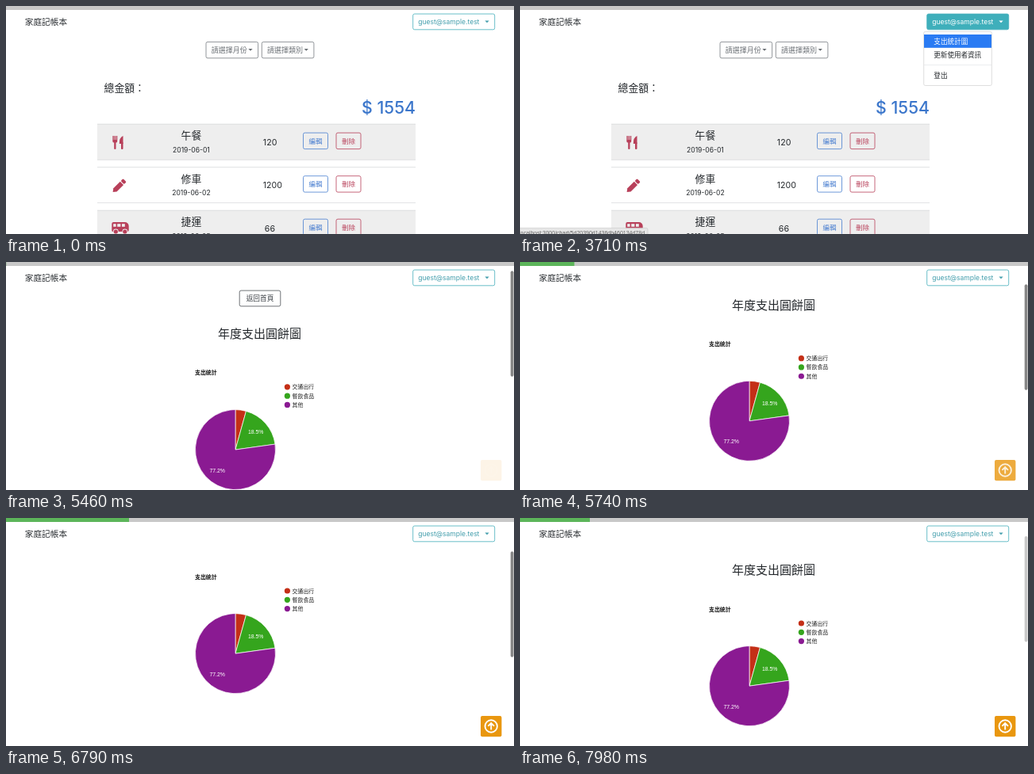
An HTML page with a canvas for the animation above (8000 ms loop, 640 by 288 pixels).

```html
<!DOCTYPE html>
<html lang="zh-Hant">
<head>
<meta charset="utf-8">
<title>家庭記帳本</title>
<style>
html, body { margin: 0; width: 100%; height: 100%; overflow: hidden; background: #fff; }
canvas { display: block; width: 640px; height: 288px; }
</style>
</head>
<body>
<canvas id="stage"></canvas>
<script>
const W = 640, H = 288, LOOP = 8000;
const canvas = document.getElementById('stage');
const ctx = canvas.getContext('2d');
const dpr = window.devicePixelRatio || 1;
canvas.width = W * dpr;
canvas.height = H * dpr;

const CJK = '"Noto Sans CJK TC", "Noto Sans CJK JP", "Noto Sans CJK", sans-serif';
const UI = 'Inter, ' + CJK;
const CHART = '"Liberation Sans", ' + CJK;
const INK = '#24282c', TEAL = '#43aeba', BLUE = '#4a7fd0', RED = '#b8405a';
const ACCOUNT = 'guest@sample.test';

// Event times in ms
const T = { hover: 1610, open: 2600, pick: 3010, leave: 4060, chart: 4760, bar: 5250, fade: 5420 };

const scrollKeys = [[5340, 0], [5460, 14], [5800, 58], [6150, 80], [7020, 80], [7140, 46], [7400, 40], [7980, 39]];
const progressKeys = [[5460, 0], [5850, 95], [6250, 155], [7060, 155], [7140, 144], [7600, 100], [7980, 88]];
const thumbKeys = [[7800, 1], [7980, 0.45]];

const clamp = v => Math.max(0, Math.min(1, v));

function track(keys, t) {
  if (t <= keys[0][0]) return keys[0][1];
  for (let i = 1; i < keys.length; i++) {
    const [t0, a] = keys[i - 1], [t1, b] = keys[i];
    if (t <= t1) return a + (b - a) * (t - t0) / (t1 - t0);
  }
  return keys[keys.length - 1][1];
}

function mix(from, to, k) {
  return `rgb(${from.map((v, i) => Math.round(v + (to[i] - v) * k)).join(',')})`;
}

// Text is placed by the vertical centre of its glyphs.
function text(str, x, cy, size, color = INK, { weight = 400, align = 'left', family = UI } = {}) {
  ctx.font = `${weight} ${size}px ${family}`;
  ctx.textAlign = align;
  ctx.fillStyle = color;
  ctx.fillText(str, x, cy + size * 0.365);
}

function box(x, y, w, h, r, fill, stroke, line = 0.8) {
  ctx.beginPath();
  ctx.roundRect(x, y, w, h, r);
  if (fill) { ctx.fillStyle = fill; ctx.fill(); }
  if (stroke) { ctx.strokeStyle = stroke; ctx.lineWidth = line; ctx.stroke(); }
}

function rect(x, y, w, h, color) {
  ctx.fillStyle = color;
  ctx.fillRect(x, y, w, h);
}

function disc(x, y, r, color) {
  ctx.beginPath();
  ctx.arc(x, y, r, 0, Math.PI * 2);
  ctx.fillStyle = color;
  ctx.fill();
}

function poly(points, color) {
  ctx.beginPath();
  points.forEach(([x, y]) => ctx.lineTo(x, y));
  ctx.closePath();
  ctx.fillStyle = color;
  ctx.fill();
}

function caret(x, y, color) {
  poly([[x - 2.6, y - 1.3], [x + 2.6, y - 1.3], [x, y + 1.4]], color);
}

function utensils(y) {
  for (const x of [134.4, 136.6, 138.8]) box(x, y, 1.4, 6.5, 0.6, RED);
  box(134.4, y + 5, 5.8, 3.6, 1.6, RED);
  box(136.2, y + 7, 2.3, 10, 1, RED);
  ctx.beginPath();
  ctx.moveTo(147.5, y);
  ctx.quadraticCurveTo(142.6, y + 2, 142.8, y + 10);
  ctx.lineTo(147.5, y + 10);
  ctx.fill();
  box(145, y + 8, 2.5, 9, 1, RED);
}

function pencil(y) {
  ctx.save();
  ctx.translate(134.6, y + 16.6);
  ctx.rotate(-Math.PI / 4);
  poly([[0, 0], [4, -3], [16, -3], [16, 3], [4, 3]], RED);
  box(17, -3, 4.2, 6, 1.4, RED);
  ctx.restore();
}

function van(y) {
  ctx.beginPath();
  ctx.roundRect(133.3, y, 21.4, 12, [2, 5, 2, 1.5]);
  ctx.fillStyle = RED;
  ctx.fill();
  for (const [x, w] of [[135.2, 3.4], [140.2, 4.2], [146, 3.8]]) rect(x, y + 2.2, w, 3.6, '#eee');
  for (const x of [138.3, 149.8]) {
    disc(x, y + 12, 3.4, '#eee');
    disc(x, y + 12, 2.6, RED);
  }
}

const rows = [
  { name: '午餐', date: '2019-06-01', cost: '120', x: 332.6, icon: utensils },
  { name: '修車', date: '2019-06-02', cost: '1200', x: 335.8, icon: pencil },
  { name: '捷運', date: '2019-06-05', cost: '66', x: 332.4, icon: van }
];

function smallButton(label, x, y, color) {
  box(x, y, 31, 20.4, 2, null, color);
  text(label, x + 15.5, y + 10.3, 8.5, color, { weight: 500, align: 'center' });
}

function filterButton(label, x) {
  box(x, 45.4, 65.6, 20.4, 2, null, '#777c81');
  text(label, x + 6.7, 55.7, 9, '#6a6f74');
  caret(x + 56, 55.4, '#6a6f74');
}

function listPage() {
  filterButton('請選擇月份', 252);
  filterButton('請選擇類別', 322.3);
  text('總金額：', 123.6, 103, 12.8, INK, { weight: 500 });
  text('$ 1554', 516, 128, 21.3, '#3b76cb', { weight: 500, align: 'right' });
  rows.forEach((row, i) => {
    const y = 148.8 + i * 54.5;
    rect(115, y, 401, 45.6, i % 2 ? '#fff' : '#eee');
    rect(115, y, 401, 0.8, '#d9dbdd');
    rect(115, y + 45, 401, 0.8, '#d9dbdd');
    row.icon(y + 15.2);
    text(row.name, 233.4, y + 14.6, 12.8, INK, { weight: 500, align: 'center' });
    text(row.date, 233.4, y + 32.6, 8.53, INK, { align: 'center' });
    text(row.cost, row.x, y + 23, 10.67, INK, { align: 'center' });
    smallButton('編輯', 374.5, y + 11.4, BLUE);
    smallButton('刪除', 416, y + 11.4, RED);
  });
}

function chartPage(t, scroll) {
  ctx.save();
  ctx.translate(0, 14 - scroll);
  box(294.2, 36.2, 51.6, 19.8, 2, null, '#4a4f54');
  text('返回首頁', 320, 46, 8.7, '#3a3f44', { align: 'center' });
  text('年度支出圓餅圖', 319.6, 90.5, 15, INK, { weight: 500, align: 'center' });
  if (t >= T.chart) pieChart();
  ctx.restore();
}

function pieChart() {
  const slices = [['交通出行', 4.3, '#c42f17'], ['餐飲食品', 18.5, '#35a51d'], ['其他', 77.2, '#8a1a92']];
  const cx = 289, cy = 237.2, radius = 50.5;
  text('支出統計', 238, 140, 6.9, '#111', { weight: 700, family: CHART });
  let angle = -Math.PI / 2;
  slices.forEach(([name, share, color], i) => {
    const end = angle + share / 100 * Math.PI * 2;
    ctx.beginPath();
    ctx.moveTo(cx, cy);
    ctx.arc(cx, cy, radius, angle, end);
    ctx.closePath();
    ctx.fillStyle = color;
    ctx.fill();
    ctx.strokeStyle = '#fff';
    ctx.lineWidth = 0.7;
    ctx.stroke();
    angle = end;
    const y = 158 + i * 11.3;
    disc(354.4, y, 3.6, color);
    text(name, 360.6, y, 6.9, '#222', { family: CHART });
  });
  const label = { align: 'center', family: CHART };
  text('18.5%', 314.7, 215, 6.93, '#fff', label);
  text('77.2%', 266.2, 263.3, 6.93, '#fff', label);
}

function header(t, progress) {
  rect(0, 0, W, 34, '#fff');
  rect(0, 0, W, 5, '#c8c8c8');
  rect(0, 0, progress, 5, '#5cb55a');
  text('家庭記帳本', 23.8, 20, 10.67, '#2b2f33');
  const filled = t < T.leave ? clamp((t - T.hover) / 150) : 0;
  const ink = mix([67, 158, 172], [255, 255, 255], filled);
  box(512.7, 10, 103, 19.8, 2, mix([255, 255, 255], [63, 175, 187], filled), TEAL);
  text(ACCOUNT, 519.3, 19.7, 8.53, ink);
  caret(606, 19.8, ink);
}

function menu(t) {
  const picked = t >= T.pick;
  box(508.7, 32.3, 85.6, 68.2, 2, '#fff', '#d0d0d0', 0.7);
  if (picked) rect(509, 36, 85, 16.8, '#2a7bf3');
  text('支出統計圖', 521.3, 44.4, 8.6, picked ? '#fff' : INK);
  text('更新使用者資訊', 521.3, 61.6, 8.55);
  rect(509, 74, 85, 0.7, '#e4e6e8');
  text('登出', 521.3, 87.8, 8.6);
}

function statusBar() {
  box(-2, 280.4, 163, 12, 2, '#e6e6e6', '#c8c8c8', 0.6);
  text('localhost:3000/chart/5d20390d1436db460134d78d', -1, 286.6, 7, '#666', { family: CHART });
}

function topButton(t) {
  ctx.globalAlpha = clamp((t - T.fade) / 400);
  box(598, 250, 26.4, 26.2, 2, '#e9970f');
  ctx.beginPath();
  ctx.arc(611.2, 263, 7.7, 0, Math.PI * 2);
  ctx.moveTo(611.2, 267.4);
  ctx.lineTo(611.2, 259.4);
  ctx.moveTo(607.4, 262.8);
  ctx.lineTo(611.2, 259);
  ctx.lineTo(615, 262.8);
  ctx.strokeStyle = '#fff';
  ctx.lineWidth = 1.9;
  ctx.stroke();
  ctx.globalAlpha = 1;
}

function draw(t) {
  ctx.setTransform(dpr, 0, 0, dpr, 0, 0);
  rect(0, 0, W, H, '#fff');
  const onList = t < T.leave;
  const scroll = track(scrollKeys, t);
  if (onList) listPage();
  else chartPage(t, scroll);
  header(t, track(progressKeys, t));
  if (onList && t >= T.open) menu(t);
  if (onList && t >= T.pick) statusBar();
  if (t >= T.fade) topButton(t);
  if (t >= T.bar) {
    ctx.globalAlpha = track(thumbKeys, t);
    box(635.7, 4.6 + scroll * 0.47, 3.8, 133.5, 1.9, '#868686');
    ctx.globalAlpha = 1;
  }
}

const start = performance.now();
function frame() {
  draw((performance.now() - start) % LOOP);
  requestAnimationFrame(frame);
}
frame();
</script>
</body>
</html>
```
